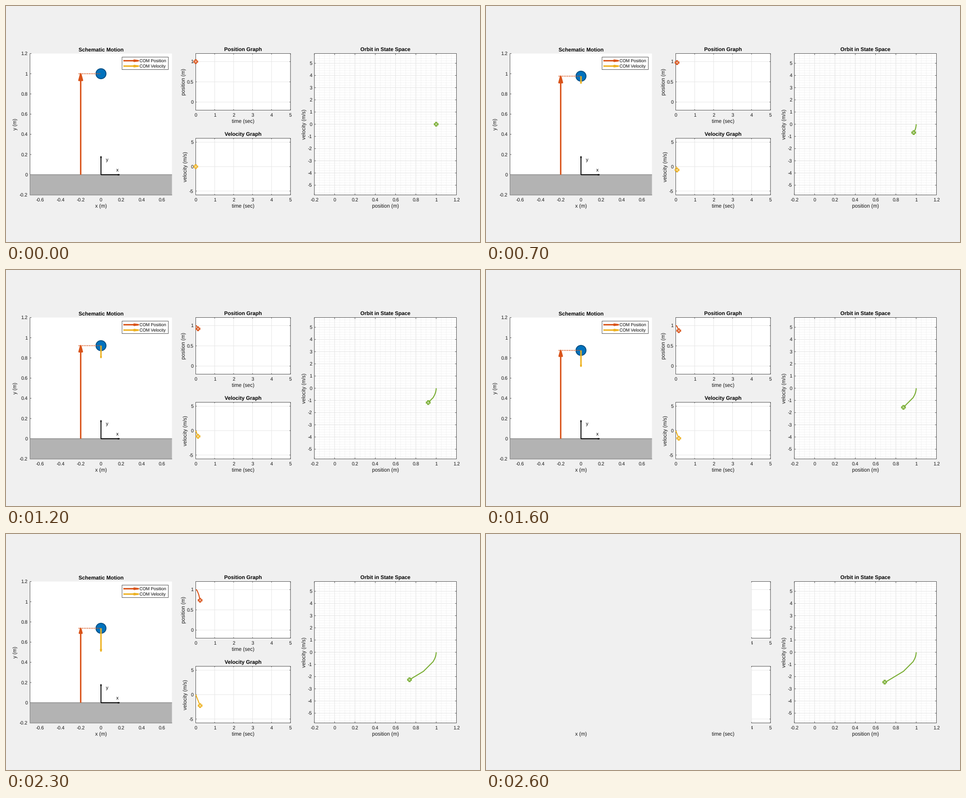
Write a matplotlib script that moves like this. It is 1058 px wide and 529 px high and loops after 2700 ms.

```python
import numpy as np
import matplotlib.pyplot as plt
from matplotlib.animation import FuncAnimation
from matplotlib.patches import Circle, Polygon, Rectangle

W, H, DPI = 1058, 529, 64
PT = 72 / DPI  # points per pixel
FRAMES, LAST, DT = 27, 25, 0.01
BG, INK, GRID, DOTS = "#f0f0f0", "#4c4c4c", "#e5e5e5", "#d0d0d0"
RED, GOLD, GREEN, BLUE = "#d95319", "#edb120", "#77ac30", "#0072bd"
TICK, LABEL, TITLE, KEY = 10.7, 11.5, 11.8, 9.6

plt.rcParams["font.family"] = "Liberation Sans"
plt.rcParams["text.hinting"] = "none"
plt.rcParams["path.snap"] = False

fig = plt.figure(figsize=(W / DPI, H / DPI), dpi=DPI, facecolor=BG)
ax = fig.add_axes([0, 0, 1, 1])
ax.set(xlim=(0, W), ylim=(H, 0))
ax.axis("off")


def line(xs, ys, color, width, z=3, **kw):
    kw.setdefault("solid_capstyle", "butt")
    return ax.plot(xs, ys, color=color, lw=width * PT, zorder=z, **kw)[0]


def rect(x0, y0, x1, y1, fill, z, edge="none"):
    return ax.add_patch(Rectangle((x0, y0), x1 - x0, y1 - y0, fc=fill, ec=edge,
                                  lw=PT, zorder=z))


def text(x, y, s, size, color="#151515", ha="center", bold=False, up=False):
    shift = 0.35 * size
    ax.text(x + shift * up, y + shift * (not up), s, fontsize=size * PT,
            color=color, ha=ha, va="baseline", rotation=90 * up,
            rotation_mode="anchor", weight="bold" if bold else "normal", zorder=5)


class Arrow:
    """Shaft with a head that grows with the arrow's length."""

    def __init__(self, color, width, z):
        self.shaft = line([], [], color, width, z)
        self.head = ax.add_patch(Polygon(np.zeros((3, 2)), fc=color, ec=color,
                                         lw=width * PT, joinstyle="round", zorder=z))

    def set(self, start, end, head=0.066, half=0.0175):
        start, end = np.array(start, float), np.array(end, float)
        d = end - start
        side = np.array([-d[1], d[0]]) * half
        base = end - d * head
        self.shaft.set_data(*zip(start, base))
        self.head.set_xy([end, base + side, base - side])
        shown = bool(np.hypot(*d) > 0.01)
        self.shaft.set_visible(shown)
        self.head.set_visible(shown)


class Plot:
    """Axes in pixel space: maps data, draws grid, ticks and labels."""

    def __init__(self, box, xlim, ylim, xticks, yticks, names, label_x,
                 framed=True, minor=None):
        self.box, self.xlim, self.ylim = box, xlim, ylim
        x0, y0, x1, y1 = box
        title, xname, yname = names
        mx, my = (x0 + x1) / 2, (y0 + y1) / 2
        rect(*box, "white", 0)
        if minor:
            dash = dict(linestyle=(0, (1.2, 2.2)))
            for v in np.arange(xlim[0], xlim[1], minor[0]):
                line([self.x(v)] * 2, [y0, y1], DOTS, 0.65, 1, **dash)
            for v in np.arange(-5.6, 5.7, minor[1]):
                line([x0, x1], [self.y(v)] * 2, DOTS, 0.65, 1, **dash)
        size = 0.01 * max(x1 - x0, y1 - y0)
        for v in xticks:
            x = self.x(v)
            if framed:
                line([x, x], [y0, y1], GRID, 1, 2)
                line([x, x], [y0, y0 + size], INK, 1)
            line([x, x], [y1 - size, y1], INK, 1)
            text(x, y1 + 10.7, f"{v:g}", TICK)
        for v in yticks:
            y = self.y(v)
            if framed:
                line([x0, x1], [y, y], GRID, 1, 2)
                line([x1 - size, x1], [y, y], INK, 1)
            line([x0, x0 + size], [y, y], INK, 1)
            text(x0 - 5, y, f"{v:g}", TICK, ha="right")
        if framed:
            rect(*box, "none", 4, INK)
        else:
            line([x0, x0, x1], [y0, y1, y1], INK, 1)
        text(mx, y0 - 9, title, TITLE, "black", bold=True)
        text(mx, y1 + 25.4, xname, LABEL)
        text(label_x, my, yname, LABEL, up=True)

    def x(self, v):
        a, b = self.xlim
        return self.box[0] + (v - a) / (b - a) * (self.box[2] - self.box[0])

    def y(self, v):
        a, b = self.ylim
        return self.box[3] - (v - a) / (b - a) * (self.box[3] - self.box[1])


class Trace:
    """A growing curve with an outlined plus at its end."""

    def __init__(self, plot, color):
        self.plot = plot
        self.curve = line([], [], color, 2.2, 5)
        self.mark = ax.add_patch(Polygon(np.zeros((12, 2)), fc="white", ec=color,
                                         lw=2 * PT, joinstyle="miter", zorder=6))
        a, b = 4.2, 1.4
        arm = np.array([(b, b), (a, b), (a, -b)])
        turn = np.array([(0, -1), (1, 0)])
        self.plus = np.vstack([arm @ np.linalg.matrix_power(turn, k)
                               for k in range(4)])

    def set(self, xs, ys):
        px, py = self.plot.x(xs), self.plot.y(ys)
        self.curve.set_data(px, py)
        self.mark.set_xy(self.plus + (px[-1], py[-1]))


tenths = [-0.2, 0, 0.2, 0.4, 0.6, 0.8, 1, 1.2]
scene = Plot((53.5, 106.5, 370.5, 423.5), (-0.7, 0.7), (-0.2, 1.2),
             [-0.6, -0.4, -0.2, 0, 0.2, 0.4, 0.6], tenths,
             ("Schematic Motion", "x (m)", "y (m)"), 20.5, framed=False)
height = Plot((423.5, 106.5, 635, 233.5), (0, 5), (-0.2, 1.2), range(6), [0, 0.5, 1],
              ("Position Graph", "time (sec)", "position (m)"), 396)
speed = Plot((423.5, 296.5, 635, 423.5), (0, 5), (-5.8, 5.8), range(6), [-5, 0, 5],
             ("Velocity Graph", "time (sec)", "velocity (m/s)"), 400.5)
orbit = Plot((688.3, 106.5, 1005.5, 423.5), (-0.2, 1.2), (-5.8, 5.8), tenths,
             range(-5, 6), ("Orbit in State Space", "position (m)", "velocity (m/s)"),
             665, minor=(0.05, 0.2))

# Ground and reference axes
left, _, right, bottom = scene.box
ox, oy = scene.x(0), scene.y(0)
rect(left, oy, right, bottom, "#b3b3b3", 4)
for edge in (oy, bottom):
    line([left, right], [edge, edge], "#989898", 2, 4)
for tip in ((ox, oy - 41), (ox + 41, oy)):
    Arrow("black", 2, 5).set((ox, oy), tip)
text(248.5, 367, "x", TICK, "black")
text(225.3, 344.5, "y", TICK, "black")

# Legend
rect(259, 114.5, 362.3, 142.5, "white", 5, INK)
for row, color, label in ((122.7, RED, "COM Position"), (134.7, GOLD, "COM Velocity")):
    Arrow(color, 3.2, 6).set((262, row), (295.5, row), 0.29, 0.04)
    text(298, row, label, KEY, "black", ha="left")

# Moving parts
ball = ax.add_patch(Circle((ox, 0), 11.2, fc=BLUE, ec="#004f84", lw=2 * PT, zorder=5))
level = line([], [], RED, 2, 6, linestyle=(0, (1, 0.9)), dash_capstyle="butt")
rise = Arrow(RED, 3.2, 6)
fall = Arrow(GOLD, 3.2, 7)
traces = Trace(height, RED), Trace(speed, GOLD), Trace(orbit, GREEN)
cover = rect(-2, -2, 592, 442, BG, 20)

# Solver output: step size grows fivefold, then stays coarse
G = 9.81
knots = np.r_[np.arange(0, 0.016, 0.0032), np.arange(0.016, 0.07, 0.016),
              np.arange(1, 6) * 0.08]
fallen = 1 - G * knots**2 / 2


def draw(n):
    t = np.arange(min(n, LAST) + 1) * DT
    pos, vel = np.interp(t, knots, fallen), -G * t
    y = scene.y(pos[-1])
    ball.center = ox, y
    level.set_data([scene.x(-0.22), ox], [y, y])
    rise.set((scene.x(-0.2), oy), (scene.x(-0.2), y))
    fall.set((ox, y), (ox, scene.y(pos[-1] + 0.1 * vel[-1])))
    for trace, xs, ys in zip(traces, (t, t, pos), (pos, vel, vel)):
        trace.set(xs, ys)
    cover.set_visible(n > LAST)
    return []


anim = FuncAnimation(fig, draw, frames=FRAMES, interval=100, repeat=True,
                     init_func=lambda: [])
plt.show()
```
